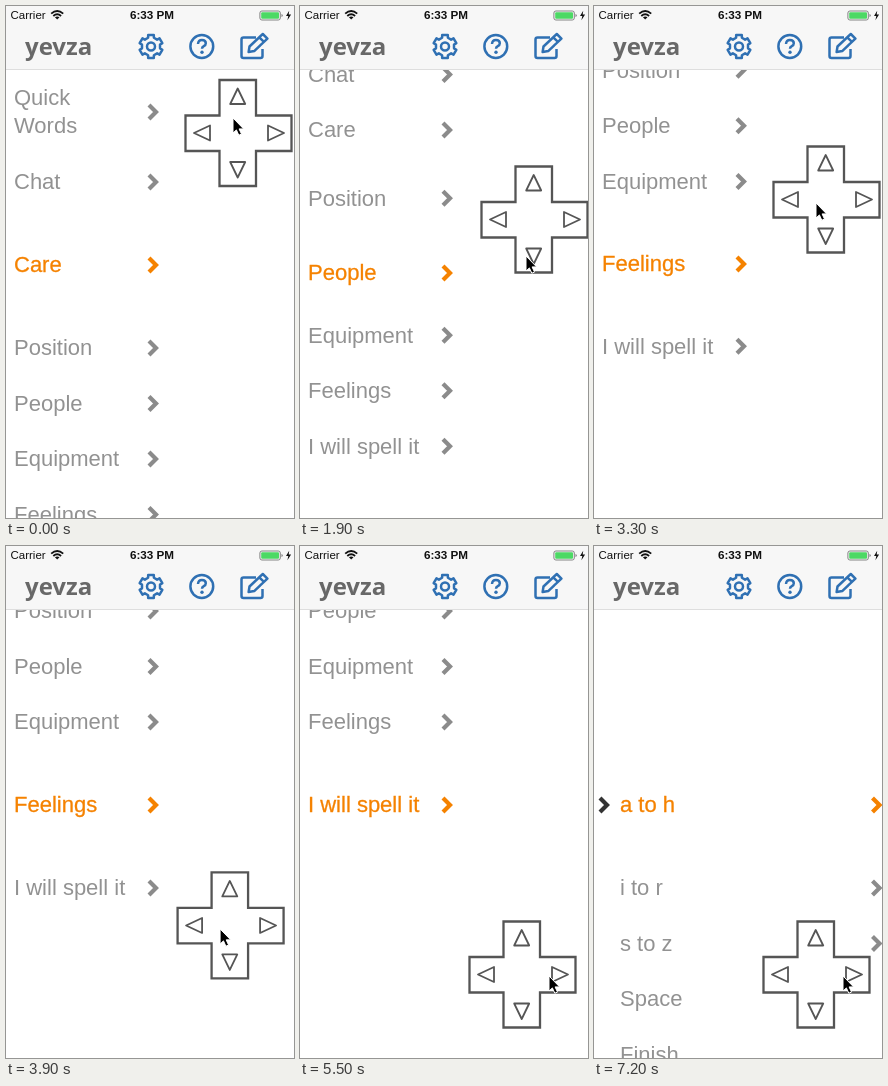
Animation of 288x512 px, one loop 7.3 s. Source, as an HTML page:

```html
<!DOCTYPE html>
<html lang="en">
<head>
<meta charset="utf-8">
<title>Menu with direction pad</title>
<style>
  html, body { margin: 0; width: 100%; height: 100%; overflow: hidden; background: #fff; }
  svg { display: block; width: 100%; height: 100%; font-family: "Liberation Sans", Arial, sans-serif; }
  .row { font-size: 22px; fill: #929292; }
  .chevron { fill: none; stroke: #8b8b8b; stroke-width: 4.2; }
  .active { fill: #f58200; }
  .active text { stroke: #f58200; stroke-width: .3; }
  .active .chevron { stroke: #f58200; }
  .opened .chevron { stroke: #333; }
  .icon { fill: none; stroke: #2f70b3; stroke-width: 2.5; stroke-linejoin: round; }
</style>
</head>
<body>
<svg viewBox="0 0 288 512">
  <rect width="288" height="512" fill="#fff"/>
  <g id="menu"></g>
  <g id="submenu"></g>

  <g id="header">
    <rect width="288" height="63" fill="#f7f7f7"/>
    <path d="M0 63.5H288" stroke="#dedede"/>
    <text x="4.5" y="13" font-size="11.5" fill="#111">Carrier</text>
    <g fill="none" stroke="#111" stroke-width="1.9">
      <path d="M45.2 7.6Q51.2 2.4 57.2 7.6M47.3 9.9Q51.2 6.6 55.1 9.9"/>
      <path d="M51.2 13.6L48.9 11.2Q51.2 9.6 53.5 11.2Z" fill="#111" stroke="none"/>
    </g>
    <text x="146" y="13" font-size="11.7" font-weight="bold" text-anchor="middle" fill="#111">6:33 PM</text>
    <rect x="253.9" y="5" width="20.4" height="9" rx="2" fill="none" stroke="#777" stroke-width=".9"/>
    <rect x="255.2" y="6.2" width="17.8" height="6.6" rx="1" fill="#4cd964"/>
    <path d="M275.5 8v3q1.2-.4 1.2-1.5t-1.2-1.5z" fill="#777"/>
    <path d="M283.2 4.8l-3.2 5.2h2.3l-.9 4.2 3.7-5.6h-2.4z" fill="#111"/>
    <text x="19" y="49" font-family="'Open Sans', 'Noto Sans', sans-serif" font-size="24" font-weight="bold" fill="#686868">yevza</text>
    <g class="icon">
      <path id="gear"/>
      <circle cx="145" cy="40.5" r="4"/>
      <circle cx="195.8" cy="40.5" r="11.4"/>
      <path d="M192 38q.3-4 3.9-4 3.9 0 3.9 3.3 0 1.9-2 2.9-1.8.9-1.8 2.6"/>
      <circle cx="196" cy="46.3" r="1.7" fill="#2f70b3" stroke="none"/>
      <path d="M250 31.5H237.5q-2 0-2 2V50q0 2 2 2H254.5q2 0 2-2V43"/>
      <path d="M243.5 40.5L256.8 28l4.6 4.6L248.2 45.1l-5.6 1zM253.3 31.3l4.6 4.6"/>
    </g>
  </g>

  <g id="pad" fill="#fff" stroke="#555" stroke-linejoin="round">
    <path stroke-width="2.3" stroke-linejoin="miter" d="M-19-53H17.5V-17.5H53V18H17.5V53H-19V18H-53V-17.5H-19Z"/>
    <path fill="none" stroke-width="1.8" d="M-.8-44.5l7.5 15.5h-15zM-.8 44.5l7.5-15.5h-15zM-44.5 0l16-7.5v15zM45.5 0l-16-7.5v15z"/>
  </g>
  <path id="cursor" d="M0 0V15L3.4 11.9 5.8 17.2 8.5 16.1 6.1 10.9H10.6Z" fill="#000" stroke="#fff"/>
</svg>

<script>
const LOOP = 7300, STEP = 100;
const ROW = 55.5, GAP = 27.5, FOCUS_Y = 259;
const SLIDE = 137, SCROLL_TIME = 500, OPEN_AT = 6000;
const FIRST = 2;
const downTaps = [1380, 1740, 2120, 2850, 4600];

// The pointer glides between spots; the pad follows it while it drags.
const gestures = [
  { at: 100, time: 700, dx: 2, dy: 86.5, drag: true },
  { at: 800, time: 400, dx: -3, dy: 51.5 },
  { at: 2850, time: 350, dx: -2, dy: -33 },
  { at: 3200, time: 100, dx: -2, dy: -20, drag: true },
  { at: 3300, time: 850, dx: -10, dy: 235, drag: true },
  { at: 4200, time: 250, dx: 3, dy: 11 },
  { at: 4850, time: 450, dx: 34, dy: -13 }
];

const $ = id => document.getElementById(id);
const progress = (t, start, length) => Math.min(1, Math.max(0, (t - start) / length));
const smooth = p => p * p * (3 - 2 * p);
const backOut = p => 1 + 2.70158 * (p - 1) ** 3 + 1.70158 * (p - 1) ** 2;

function follow(x, y, moves, t) {
  for (const { at, time, dx, dy } of moves) {
    const p = smooth(progress(t, at, time));
    x += dx * p;
    y += dy * p;
  }
  return [x, y];
}

function place(node, x, y) {
  node.setAttribute("transform", `translate(${x} ${y})`);
}

function add(parent, tag, attrs, text = "") {
  const node = document.createElementNS("http://www.w3.org/2000/svg", tag);
  for (const key in attrs) node.setAttribute(key, attrs[key]);
  node.textContent = text;
  return parent.appendChild(node);
}

function addRow(parent, label, textX, chevronX) {
  const row = add(parent, "g", { class: "row" });
  const lines = label.split("\n");
  lines.forEach((line, i) =>
    add(row, "text", { x: textX, y: 7.3 + 28 * (i - (lines.length - 1) / 2) }, line));
  if (chevronX) add(row, "path", { class: "chevron", d: `M${chevronX - 4} -7l7 7-7 7` });
  return row;
}

const rows = ["Quick\nWords", "Chat", "Care", "Position", "People", "Equipment", "Feelings", "I will spell it"]
  .map(label => addRow($("menu"), label, 8, 147));
const baseY = rows.map((_, i) => i ? i * ROW : -14.5);

["a to h", "i to r", "s to z", "Space", "Finish"].forEach((label, i) => {
  const row = addRow($("submenu"), label, 26, i < 3 ? 282.5 : 0);
  if (!i) row.classList.add("active");
  place(row, 0, FOCUS_Y + i * ROW + (i ? GAP : 0));
});

function gearPath(cx, cy, teeth) {
  const corners = Array.from({ length: teeth * 4 }, (_, i) => {
    const side = i % 4;
    const outer = side === 1 || side === 2;
    const turn = (side < 2 ? -1 : 1) * (outer ? .24 : .32);
    const angle = Math.PI * (2 * Math.floor(i / 4) / teeth - .5) + turn;
    const r = outer ? 11.8 : 9.2;
    return `${cx + r * Math.cos(angle)} ${cy + r * Math.sin(angle)}`;
  });
  return `M${corners.join("L")}Z`;
}
$("gear").setAttribute("d", gearPath(145, 40.5, 6));

function drawMenu(t) {
  const moves = downTaps.map(start => progress(t, start, SCROLL_TIME));
  const focus = FIRST + downTaps.filter(start => t >= start).length;
  const scroll = baseY[FIRST] + GAP - FOCUS_Y + ROW * moves.reduce((sum, p) => sum + backOut(p), 0);
  const opened = t >= OPEN_AT;
  const fade = 1 - progress(t, OPEN_AT, 300);
  let extra = 0;
  rows.forEach((row, i) => {
    const arriving = i < FIRST ? 0 : smooth(moves[i - FIRST - 1] ?? 1);
    const leaving = (1 - (moves[i - FIRST] ?? 0)) ** 2;
    const margin = GAP * arriving * leaving;
    place(row, 0, baseY[i] + extra + margin - scroll);
    extra += 2 * margin;
    row.classList.toggle("active", i === focus && !opened);
    row.classList.toggle("opened", i === focus && opened);
    row.setAttribute("opacity", i === focus ? 1 : fade);
  });
}

function draw(t) {
  drawMenu(t);
  const slide = SLIDE * smooth(progress(t, 6300, 800));
  place($("menu"), -slide, 0);
  place($("submenu"), SLIDE - slide, 0);
  $("submenu").setAttribute("opacity", progress(t, OPEN_AT, 300));
  place($("pad"), ...follow(232.5, 127, gestures.filter(g => g.drag), t));
  place($("cursor"), ...follow(227, 112, gestures, t));
}

const begin = performance.now();
function tick() {
  const t = (performance.now() - begin) % LOOP;
  draw(Math.floor(t / STEP) * STEP);
  requestAnimationFrame(tick);
}
tick();
</script>
</body>
</html>
```
